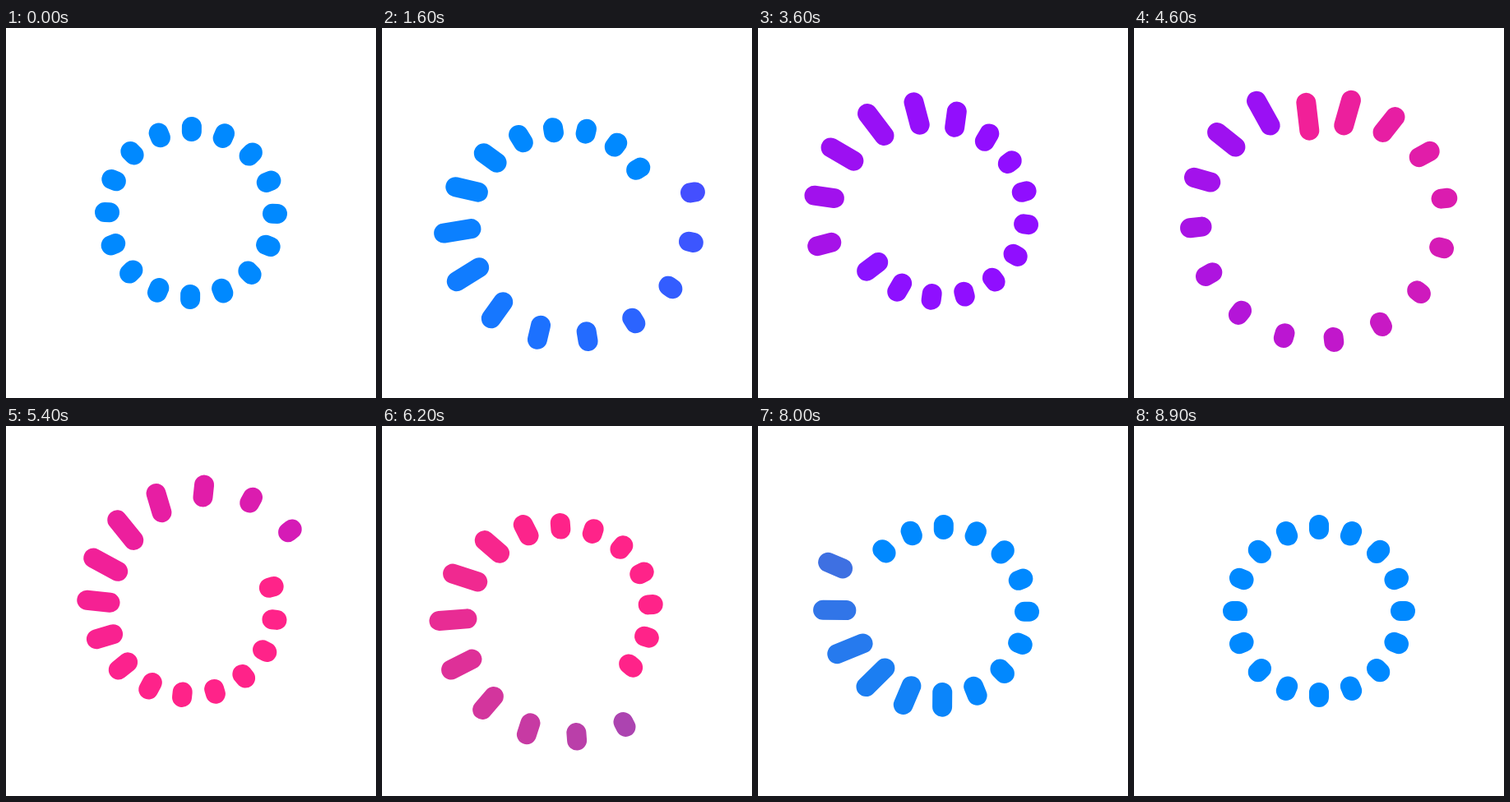
These frames come from a looping animation (450x450 px, 9000 ms). An HTML page with a canvas:

```html
<!DOCTYPE html>
<html lang="en">
<head>
<meta charset="utf-8">
<title>Ring loader</title>
<style>
  html, body { margin: 0; width: 100%; height: 100%; overflow: hidden; background: #fff; }
  canvas { display: block; }
</style>
</head>
<body>
<canvas id="stage" width="450" height="450"></canvas>
<script>
const ctx = document.getElementById('stage').getContext('2d');

const LOOP = 9000, STEP = 100;
const COUNT = 16, STAGGER = 80;
const FIRST = 725, HALF = 1200;        // first wave, time between waves
const LEAD = 425, TRAIL = 825;         // travel time of the front and back ends
const INNER = 99, TRAVEL = 53, LENGTH = 6, WIDTH = 24;
const COLORS = [[0, 137, 255], [144, 14, 255], [255, 35, 137], [0, 137, 255]];

const clamp = x => Math.min(1, Math.max(0, x));
const smooth = x => (x = clamp(x), x * x * (3 - 2 * x));

// cubic-bezier(.238, 0, .841, 1)
function spinEase(x) {
  let lo = 0, hi = 1;
  for (let i = 0; i < 24; i++) {
    const s = (lo + hi) / 2, r = 1 - s;
    if (3 * 0.238 * s * r * r + 3 * 0.841 * s * s * r + s ** 3 < x) lo = s;
    else hi = s;
  }
  return smooth(lo);
}

// Each pill goes out and back three times, one colour change per trip.
function pill(time) {
  let near = 0, far = 0, color = COLORS[0];
  for (let trip = 0; trip < 3; trip++) {
    const out = time - trip * 2 * HALF, back = out - HALF;
    near += smooth(out / TRAIL) - smooth(back / LEAD);
    far += smooth(out / LEAD) - smooth(back / TRAIL);
    if (out > 0) {
      const p = smooth(out / (HALF + TRAIL));
      color = COLORS[trip].map((c, i) => Math.round(c + (COLORS[trip + 1][i] - c) * p));
    }
  }
  return {
    from: INNER + TRAVEL * near,
    to: INNER + LENGTH + TRAVEL * far,
    color: `rgb(${color})`
  };
}

function draw(time) {
  ctx.setTransform(1, 0, 0, 1, 0, 0);
  ctx.fillStyle = '#fff';
  ctx.fillRect(0, 0, 450, 450);
  ctx.translate(225, 225);
  ctx.rotate(4 * Math.PI * spinEase(time / LOOP));
  ctx.lineWidth = WIDTH;
  ctx.lineCap = 'round';
  for (let i = 0; i < COUNT; i++) {
    const { from, to, color } = pill(time - FIRST - i * STAGGER);
    ctx.strokeStyle = color;
    ctx.beginPath();
    ctx.moveTo(0, -from);
    ctx.lineTo(0, -to);
    ctx.stroke();
    ctx.rotate(2 * Math.PI / COUNT);
  }
}

const start = performance.now();
function tick() {
  const elapsed = Math.max(0, performance.now() - start);
  draw((Math.floor(elapsed / STEP) + 1) * STEP % LOOP);
  requestAnimationFrame(tick);
}
tick();
</script>
</body>
</html>
```
